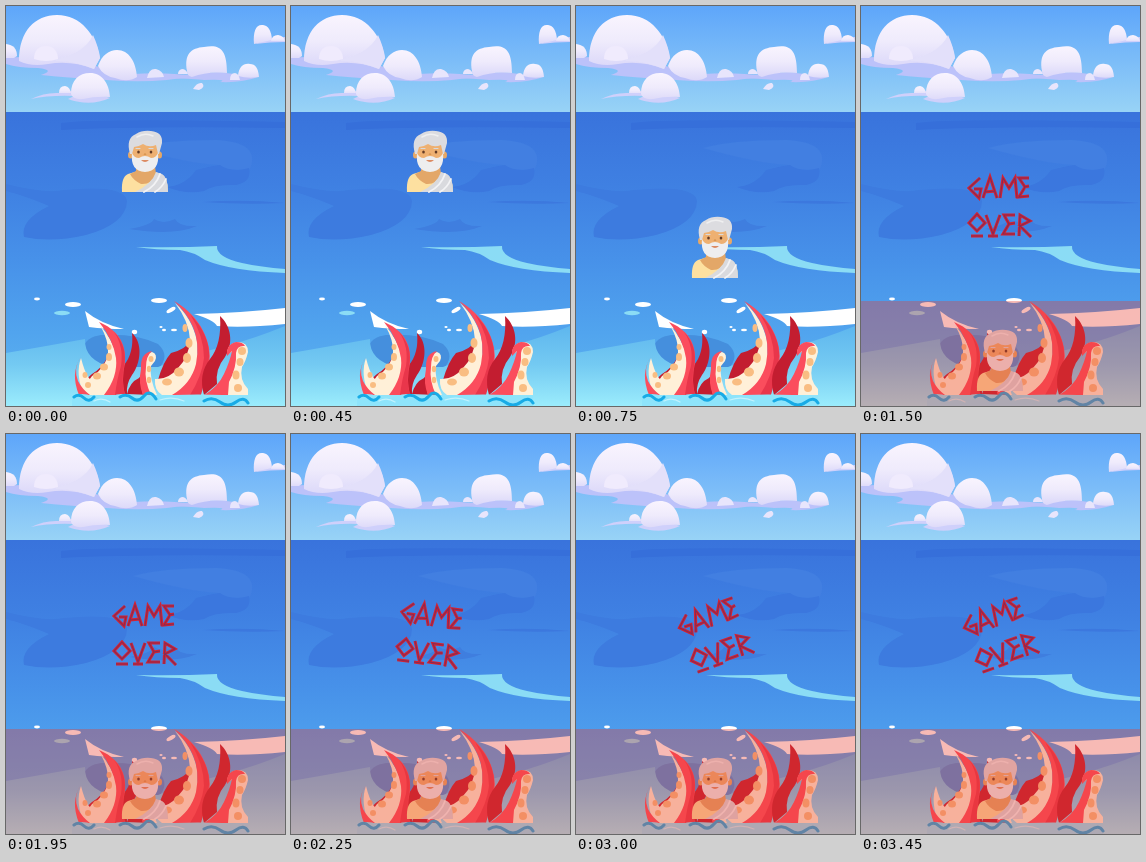
These frames come from a looping animation (279x400 px, 3750 ms). An HTML page with a canvas:

```html
<!DOCTYPE html>
<html lang="en">
<head>
<meta charset="utf-8">
<title>Game over</title>
<style>
html, body { margin: 0; width: 100%; height: 100%; overflow: hidden; }
canvas { display: block; width: 279px; height: 400px; }
</style>
</head>
<body>
<canvas id="stage"></canvas>
<script>
const W = 279, H = 400, STEP = 750;
const canvas = document.getElementById('stage');
const ctx = canvas.getContext('2d');
const ratio = window.devicePixelRatio || 1;
canvas.width = W * ratio;
canvas.height = H * ratio;
ctx.scale(ratio, ratio);

function shape(color, d) {
  ctx.fillStyle = color;
  ctx.fill(new Path2D(d));
}

function line(color, width, d) {
  ctx.strokeStyle = color;
  ctx.lineWidth = width;
  ctx.stroke(new Path2D(d));
}

function oval(color, x, y, rx, ry = rx, turn = 0) {
  ctx.fillStyle = color;
  ctx.beginPath();
  ctx.ellipse(x, y, rx, ry, turn, 0, Math.PI * 2);
  ctx.fill();
}

function ovals(color, list) {
  for (const item of list) oval(color, ...item);
}

function fade(top, bottom, ...stops) {
  const g = ctx.createLinearGradient(0, top, 0, bottom);
  stops.forEach((c, i) => g.addColorStop(i / (stops.length - 1), c));
  return g;
}

const puff = (top, bottom) => fade(top, bottom, '#f9f4fe', '#efebfc', '#dad7f9');

function drawSky() {
  ctx.fillStyle = fade(0, 106, '#5ea6fa', '#7bbcf8', '#98d3f6');
  ctx.fillRect(0, 0, W, 106);

  // Large bank on the left
  shape('#bcc2fa', 'M0 52Q20 49 60 54L128 68Q160 66 187 70Q150 78 100 74Q65 72 35 69Q50 64 32 62Q12 62 0 58Z');
  shape(puff(36, 54), 'M0 38Q11 39 11 50L8 52H0Z');
  shape(puff(9, 62), 'M13 55C13 25 29 9 51 9C75 9 90 29 94 52L88 63Q65 54 42 58Q25 61 13 55Z');
  shape('#e3e0fa', 'M50 53Q78 48 87 29Q93 42 94 52L88 63Q65 54 50 55Z');
  shape('#f0ebfd', 'M28 53C28 44 33 40 40 40C48 40 52 46 52 53Q40 57 28 53Z');
  shape(puff(44, 76), 'M92 60C96 49 103 44 111 44C123 44 130 56 131 71Q122 77 109 72Q97 70 92 60Z');

  // Low cloud
  shape('#cfd0fb', 'M25 93Q39 86 54 87L75 83L104 92Q84 101 62 93L68 90Q44 89 25 93Z');
  shape(puff(67, 96), 'M65 88C65 74 73 67 84 67C96 67 103 77 104 91Q90 90 77 93Q67 94 65 88Z');
  shape(puff(79, 90), 'M53 87Q53 80 59 80Q64 81 65 87Z');

  // Cloud on the right
  shape('#bcc2fa', 'M127 73Q148 67 176 69L212 66L252 71Q236 77 214 76Q223 73 198 74Q172 71 127 73Z');
  shape(puff(40, 71), 'M181 65C178 48 185 42 198 41C214 38 221 43 221 67Q202 65 186 71Q181 70 181 65Z');
  shape(puff(57, 73), 'M232 70C233 61 237 57 244 58Q252 58 253 71Q242 73 232 70Z');
  shape('#e8e5fc', 'M224 74Q224 67 229 67Q233 68 234 74ZM141 72Q143 62 150 63Q157 65 158 71ZM172 68Q172 64 176 63Q180 63 182 68Z');
  shape('#e8e5fc', 'M187 83Q191 76 196 77Q200 81 193 84Z');

  // Cloud in the corner
  shape('#cfd0fb', 'M249 38Q262 32 279 31V36Q264 36 249 38Z');
  shape(puff(18, 39), 'M248 38C247 25 250 18 257 19Q265 20 266 34Z');
  shape(puff(29, 37), 'M265 35Q266 29 272 29Q278 30 279 35Z');
}

function drawSea() {
  ctx.fillStyle = fade(106, 400, '#3973dc', '#3f80e2', '#4791e9', '#51a4ee', '#60b8f0');
  ctx.fillRect(0, 106, W, 294);

  shape('#366fda', 'M55 117Q90 112 279 116V122Q130 120 55 124Z');
  shape('#427fe1', 'M127 142Q155 134 210 134Q255 136 244 163Q225 166 212 159Q180 157 127 142Z');
  shape('#3b77de', 'M190 164Q205 160 214 159Q225 167 243 162Q246 176 230 179Q208 178 198 185Q180 189 161 181Q180 179 190 164Z');
  shape('#3d7bdf', 'M0 178Q40 188 58 184Q119 178 121 195Q120 218 80 229Q46 237 18 231Q14 214 43 200Q20 190 0 185Z');
  shape('#3c78de', 'M196 196Q239 193 279 197Q239 199 196 196Z');
  shape('#3f7edf', 'M123 223Q146 219 148 213Q157 219 169 213Q173 221 191 220Q168 230 123 223Z');
  shape('#458fdd', 'M77 342Q80 331 95 329Q130 327 152 338Q165 350 152 363H98Q78 356 77 342Z');

  const shallow = fade(318, 400, '#5db5ee', '#74caf2', '#9becfc');
  shape(shallow, 'M0 347Q35 341 79 333Q78 354 105 361H152Q180 350 220 340Q250 332 279 320V400H0Z');
  shape('#8bdcf5', 'M130 241Q170 242 211 240Q210 251 236 257Q255 261 279 263V267Q225 265 199 254Q188 246 174 244Q150 244 130 241Z');
  shape('#ffffff', 'M79 305Q95 318 118 323Q99 323 83 321Z');
  shape('#ffffff', 'M188 308Q235 307 279 302V318Q240 322 211 320Q208 314 188 308Z');
  ovals('#ffffff', [
    [67, 298.5, 8, 2.6], [31, 293, 3, 1.4], [153, 294.5, 8, 2.6], [128.5, 326, 2.7, 2.2],
    [165, 304, 5, 2, -.5], [155, 321, 1.6, 1], [158, 324, 2, 1.2], [168, 324, 3, 1.2]
  ]);
  oval('#8bdcf5', 56, 307, 8, 2.2);
}

function drawTentacles() {
  const coral = '#fb4d5d', deep = '#e9364b', dark = '#c31d30', cream = '#fff0d8', cup = '#f9bd82';

  // Left group
  shape(dark, 'M126 327C137 337 135 357 126 369Q120 378 121 388H108Q108 370 118 359Q128 347 126 327Z');
  shape(dark, 'M80 388Q77 374 86 368Q96 362 101 352L106 388Z');
  shape(cream, 'M94 319Q103 335 102 347Q100 362 86 370Q79 377 84 389H104Q115 367 110 347Q105 332 94 319Z');
  shape(coral, 'M93 316C110 323 121 336 119 357Q115 374 119 389H98Q112 371 110 352Q107 333 93 316Z');
  shape(deep, 'M108 326Q122 341 118 360Q115 374 119 389H109Q111 373 115 360Q118 340 108 326Z');
  shape(cream, 'M75 352Q78 364 82 371Q89 377 90 389H78Q69 368 75 352Z');
  shape(coral, 'M75 351Q67 362 72 375Q76 383 84 389H73Q64 367 75 351Z');
  ovals(cup, [[103, 341, 2.5, 3], [103, 351, 3, 4], [98, 361, 4, 3.5], [91, 370, 4, 3.5], [79, 369, 2.5, 3], [82, 379, 3, 3]]);

  // Middle group
  shape(dark, 'M189 331Q179 344 165 347Q157 356 152 374H184Z');
  shape(dark, 'M121 388Q124 376 133 372Q138 367 138 359L145 389Z');
  shape(cream, 'M169 297Q183 315 184 334Q183 351 172 362Q162 374 149 373Q148 384 156 389H181Q194 365 191 335Q186 312 169 297Z');
  shape(coral, 'M168 295C184 304 199 320 203 342Q206 358 198 372Q192 382 195 389H166Q185 378 190 358Q194 337 187 321Q181 307 168 295Z');
  shape(deep, 'M184 308Q204 329 203 351Q201 368 195 389H184Q196 370 198 352Q198 330 184 308Z');
  ovals(cup, [[179, 322, 2.5, 4], [183, 337, 3.5, 5], [181, 352, 4, 5], [173, 366, 5, 4.5], [161, 376, 5, 3.5]]);
  shape(cream, 'M137 389Q134 371 137 360Q139 347 146 346Q152 348 149 355L145 360Q143 372 151 389Z');
  shape(coral, 'M146 345Q134 347 135 363Q132 377 137 389H145Q138 374 140 361Q140 350 146 345Z');
  ovals(cup, [[145, 353, 2.5, 3], [143, 363, 2.2, 3.2], [143, 374, 2.2, 3.2]]);

  // Right group
  shape(dark, 'M214 310C225 320 228 337 219 351Q209 363 211 378L198 389Q192 368 204 353Q216 338 214 310Z');
  shape(cream, 'M221 349Q221 337 232 336Q242 336 242 346Q240 355 236 361Q233 374 242 383V389H218Q224 370 227 354Q231 346 227 345Z');
  shape(coral, 'M221 350Q220 338 230 336Q237 336 239 340Q231 339 230 347Q231 361 223 376L222 389H198Q212 381 218 368Q224 355 226 345Z');
  ovals(cup, [[236, 345, 4, 4], [234, 356, 3.5, 4], [230, 369, 3.5, 4.5], [232, 382, 4, 4]]);

  // Water line
  shape('#8ee4fb', 'M66 390Q76 386 86 390T106 390T126 390T146 390Q190 387 242 390V400H66Z');
  ctx.lineCap = 'round';
  line('#18abe6', 3, 'M68 391Q73 387 78 392T88 391M114 391Q120 387 126 392T138 390T150 393M198 395Q206 390 214 396T230 396T242 397');
  line('#c2f2fd', 1.2, 'M88 395Q96 391 104 396M154 394Q166 390 178 395');
}

function drawMan(dy) {
  ctx.save();
  ctx.translate(0, dy);
  shape('#fde0a0', 'M116 186Q115 171 122 168L132 165H146L155 168Q162 171 162 186Z');
  shape('#e3a768', 'M130 160H149L150 168Q145 179 135 178Q127 174 124 168L130 165Z');
  shape('#d9dade', 'M150 166L156 168Q162 171 162 186H129Q146 178 150 166Z');
  line('#f3f3f5', 1.8, 'M154 168Q150 180 138 186M160 173Q156 182 149 186');
  ovals('#e7a866', [[124.5, 149, 2.5, 3.6], [153.5, 149, 2.5, 3.6]]);
  shape('#eeb071', 'M126 138Q139 131 152 138V151Q150 162 139 163Q128 162 126 151Z');
  shape('#eeeeef', 'M126 147Q128 152 133 152Q139 148 145 152Q150 152 152 147Q154 165 139 166Q124 165 126 147Z');
  shape('#dcdce0', 'M124 148C121 137 123 131 130 128Q136 124 145 125Q157 126 156 137L153 148H152L150 139Q143 142 137 138Q132 141 128 141L126 148Z');
  line('#efeff0', 1.5, 'M131 131Q139 126 147 130');
  ovals('#633b26', [[132.5, 146, 1.3, 1.5], [145, 146, 1.3, 1.5]]);
  line('#d9d9dc', 1.2, 'M130 142.5H134M143 142.5H147');
  shape('#d99652', 'M137.5 149Q139 145 140.5 149Z');
  shape('#dc8a62', 'M135 154H143Q139 158 135 154Z');
  ctx.restore();
}

const LETTERS =
  'M118 171L107 181L117 191L119 182L112 182' +
  'M121 191L128 170L135 191M123 185L133 184' +
  'M138 191L141 171L147 181L153 171L155 191' +
  'M167 171L157 171L163 180L157 190L167 189M162 180L167 179' +
  'M115 207L123 216L115 224L107 216ZM109 229H121' +
  'M124 208L131 227L138 208M126 229H136' +
  'M153 208L142 208L147 217L141 227L153 227M147 217L153 216' +
  'M157 229L158 208L168 214L158 219L169 230';

function drawTitle(degrees) {
  ctx.save();
  ctx.translate(139, 201);
  ctx.rotate(degrees * Math.PI / 180);
  ctx.translate(-138, -200);
  ctx.lineCap = 'butt';
  ctx.lineJoin = 'miter';
  line('#d9202f', 3, LETTERS);
  line('#862b54', 1.1, LETTERS);
  ctx.restore();
}

const POSES = [
  { man: 0 },
  { man: 86 },
  { man: 199, tilt: 0 },
  { man: 199, tilt: 8 },
  { man: 199, tilt: -20 }
];

function render(now) {
  const { man, tilt } = POSES[Math.floor(now / STEP) % POSES.length];
  drawSky();
  drawSea();
  drawTentacles();
  drawMan(man);
  if (tilt !== undefined) {
    ctx.fillStyle = 'rgba(232, 58, 45, .35)';
    ctx.fillRect(0, 295, W, 105);
    drawTitle(tilt);
  }
}

const start = performance.now();
function tick() {
  render(performance.now() - start);
  requestAnimationFrame(tick);
}
tick();
</script>
</body>
</html>
```
